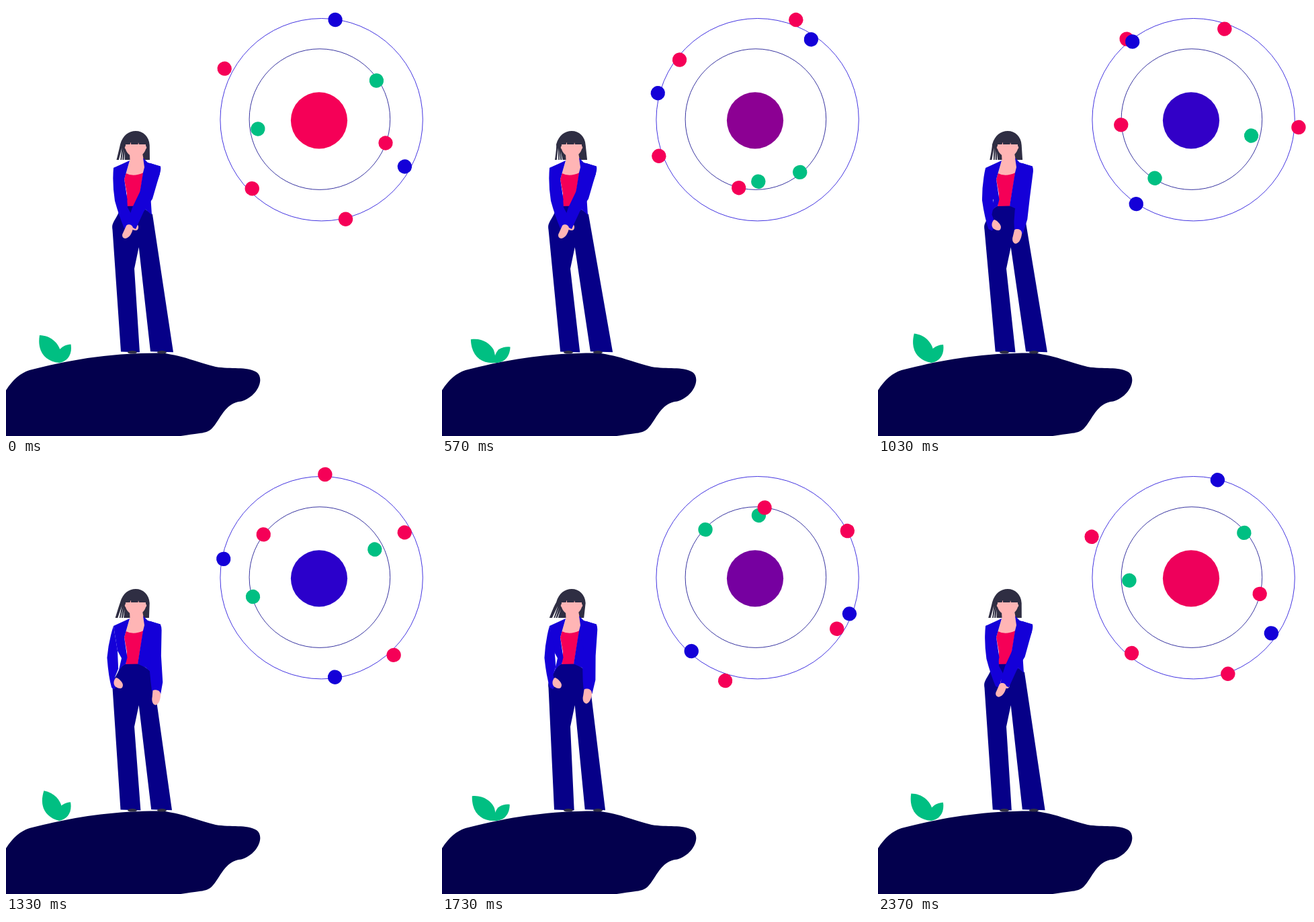
An HTML page for the animation above (2410 ms loop, 640 by 640 pixels).

```html
<!DOCTYPE html>
<html lang="en">
<head>
<meta charset="utf-8">
<title>Orbit</title>
<style>
  html, body { margin: 0; height: 100%; overflow: hidden; background: #fff; }
  svg { display: block; width: 100vw; height: 100vh; }
  .blue { fill: #1400d8; }
  .pink { fill: #f50057; }
  .green { fill: #00bf82; }
  .navy { fill: #060088; }
  .skin { fill: #ffb5b5; }
  .dark { fill: #2f2e43; }
</style>
</head>
<body>
<svg viewBox="0 0 640 640">
  <g fill="none" stroke-width=".8">
    <circle cx="469.6" cy="169.2" r="150.7" stroke="#1400d8"/>
    <circle cx="466.9" cy="168.6" r="104.8" stroke="#060088"/>
  </g>
  <circle id="core" cx="466" cy="170.3" r="42.1"/>
  <g id="dots"></g>

  <path fill="#03004d" d="M0 572C10 556 22 546 35 542C90 528 150 516 232 516.5C262 520 280 529 312 537C335 541 358 536 373 545C386 555 374 582 350 588.5C326 590 318 617 308 627C300 637 290 635 260 640H0Z"/>
  <g class="green">
    <path id="leafL" d="M50 490C68 490.500 78 503 80.500 512C81.500 520 81 526 79 531C58 529 46 514 50 490Z"/>
    <path id="leafR" d="M96.500 503.500C89 504 84 507 80 511C76 518 76 526 79 531C92 529 99 518 96.500 503.500Z"/>
  </g>

  <path id="hair" class="dark"/>
  <path id="slits" fill="#fff"/>
  <path class="skin" d="M184 219H203L207 240L204 251L190 255L178 251L184.500 229Z"/>
  <path class="skin" d="M178 203H208V208Q210.500 211 208 213C206 220 200 224.500 193 224.500C186 224.500 180 220 178 213Q175.500 211 178 208Z"/>
  <path class="dark" d="M176 198H210V206H198L197 203L196.500 206H186L185.800 202L184.500 206H176Z"/>
  <path class="pink" d="M178.500 249Q190 255 204.500 248L196 299H178L180 280L176 258Z"/>
  <path id="legs" class="navy"/>
  <ellipse class="dark" cx="188" cy="515.300" rx="7" ry="2.300"/>
  <ellipse class="dark" cx="232" cy="515.300" rx="7" ry="2.300"/>
  <g class="blue">
    <path d="M184 230L160 241L166 278L172 289L167 311Q171 300 178 298L180.500 288L176 258Z"/>
    <path d="M204 226L211 233L230 238.500L229 250L215.500 288L217 311L208 303L196 297.500L204 248L206 240Z"/>
    <path id="sleeveL"/>
  </g>
  <path id="handL" class="skin" d="M168 318C172 319 178 325 178 329C178 334 174 336 167 331.500C163 328 164 321 168 318Z"/>
  <path id="sleeveR" class="blue"/>
  <path id="handR" class="skin"/>
</svg>
<script>
const $ = id => document.getElementById(id);
const LOOP = 2410, STEPS = 60;

// kind, orbit radius, start angle (degrees, clockwise from the right), direction
const dots = [
  ['green', 92.5, 171.2, -1], ['green', 102.9, -34.2, 1], ['pink', 104.8, 19.6, 1],
  ['pink', 160.1, -151.8, 1], ['pink', 143.5, 134.2, 1], ['pink', 153.5, 75.2, 1],
  ['blue', 150.2, -80.9, -1], ['blue', 145.2, 28.9, -1]
].map(([kind, radius, start, dir]) => {
  const el = document.createElementNS('http://www.w3.org/2000/svg', 'circle');
  el.setAttribute('class', kind);
  el.setAttribute('cx', radius);
  el.setAttribute('r', 10.7);
  $('dots').append(el);
  return { el, start, dir };
});

// Arm shapes: hands clasped, arms hanging
const arms = {
  sleeveL: [
    'M160 241Q158 265 162 290Q168 312 176 331L184 333L191 318L181 300L180 285L172 236Z',
    'M160 241Q152 262 148.500 288Q150 318 154 333Q157 336 161 333L159 320L165 308L165 285L172 236Z'
  ],
  sleeveR: [
    'M207 240L205 250L200 275L188 300L182 318L181 326L193 332L205 306L218 287L229 249Q231 243 230 239L215 234Z',
    'M207 240L205 250L217 285L218 307L221 325L223 339L236 346L238 328L233 285L232 249Q232 243 230 239L215 234Z'
  ],
  handR: [
    'M179 327C181 324 189 325 189 331C188 337 184 345 178 346C173 346 172 341 174 338Z',
    'M225 339C228 337 237 338 237 345C237 352 235 360 230 361C225 360 224 353 225 348Z'
  ]
};

const lerp = (a, b, u) => a + (b - a) * u;

function mixPath([from, to], u) {
  const goal = to.match(/[\d.]+/g);
  let i = 0;
  return from.replace(/[\d.]+/g, v => lerp(+v, +goal[i++], u).toFixed(2));
}

// Linear keyframes: pairs of step and value
function track(n, ...keys) {
  const i = keys.findIndex(([step], k) => k && n <= step);
  const [s0, v0] = keys[i - 1], [s1, v1] = keys[i];
  return lerp(v0, v1, (n - s0) / (s1 - s0));
}
const sway = (n, rest, right, left) => track(n, [0, rest], [20, right], [40, left], [60, rest]);

// 25 drawings per second shown on a 30 Hz clock
function stepAt(ms) {
  const r = ms % 100;
  const tick = 3 * Math.floor(ms / 100) + (r >= 30) + (r >= 70);
  return Math.min(STEPS - 1, Math.ceil(tick * 5 / 6 - .5));
}

function draw(n) {
  for (const { el, start, dir } of dots)
    el.setAttribute('transform', `translate(466.3 168.8) rotate(${start + dir * n * 6})`);

  const cool = 1 - Math.abs(n - 30) / 30;
  $('core').setAttribute('fill', `rgb(${lerp(245, 20, cool)},0,${lerp(87, 216, cool)})`);

  const tiltL = track(n, [0, 0], [12, -13.4], [31, 11.8], [46.5, -13.4], [60, 0]);
  const tiltR = track(n, [0, 0], [12, 13], [31, -3], [46, 12.4], [60, 0]);
  $('leafL').setAttribute('transform', `rotate(${tiltL} 79 531)`);
  $('leafR').setAttribute('transform', `rotate(${tiltR} 79 531)`);

  const d = sway(n, 0, 5, -5.5);
  $('hair').setAttribute('d', `M${164.5 + d} 229Q${169 + d * .5} 211 170 206C174 192 183 186 193 186C204 186 213 194 213.7 207L${214 + d * .6} 229H${164.5 + d}Z`);
  $('slits').setAttribute('d', [[168.9, 172.5, 211, 1.3], [172.6, 174.5, 213, .7], [176, 176.7, 216, .7]]
    .map(([x, top, y, w]) => `M${x + d * .9 - w} 230L${top} ${y}L${x + d * .9 + w} 230Z`).join(''));

  $('legs').setAttribute('d', `M177 298C170 301 168 307 166 311C160 322 157 325 158.500 333
    L${sway(n, 171, 178.3, 166.3)} 514.500L${sway(n, 199, 208, 196.3)} 515.500L191 391L197.700 359
    L${sway(n, 215, 223.4, 212.3)} 514.300L${sway(n, 249, 256.3, 242)} 515.300L218 310L200 297.500Z`);

  const u = track(n, [0, 0], [15, 0], [36, 1], [60, 0]);
  for (const id in arms) $(id).setAttribute('d', mixPath(arms[id], u));
  $('handL').setAttribute('transform', `translate(${27 * (.708 - u)} 0)`);
}

const begin = performance.now();
function frame() {
  draw(stepAt((performance.now() - begin) % LOOP));
  requestAnimationFrame(frame);
}
frame();
</script>
</body>
</html>
```
